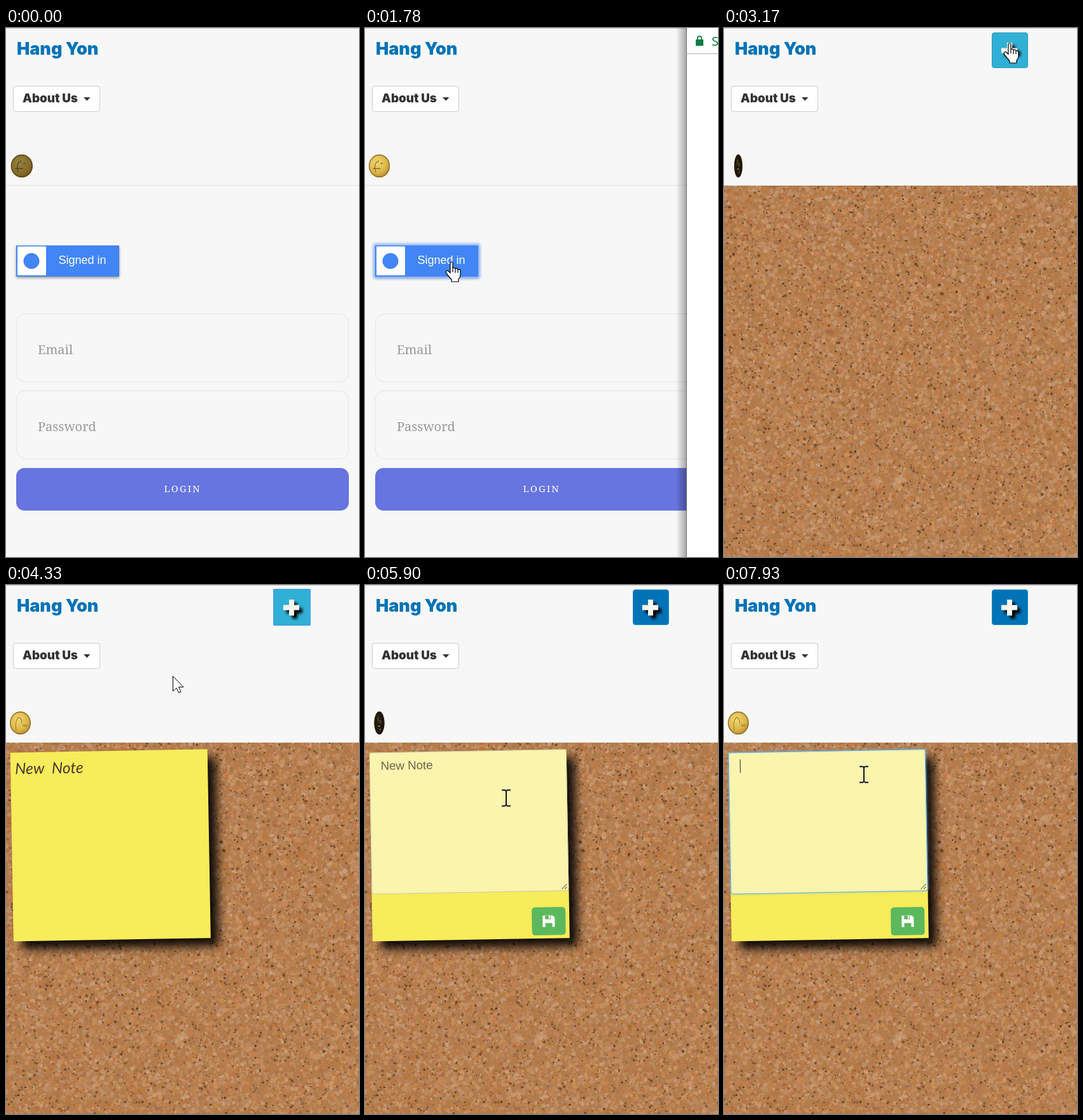
These frames come from a looping animation (555 by 832 pixels, 7.99 s). An HTML page with a canvas:

```html
<!DOCTYPE html>
<html lang="en">
<head>
<meta charset="utf-8">
<title>Note board</title>
<style>
  html, body { margin: 0; width: 100%; height: 100%; overflow: hidden; background: #f7f7f7; }
  canvas, svg { position: absolute; left: 0; top: 0; display: block; }
  .brand { font: 900 27px Inter, sans-serif; fill: #0073b7; }
  .menu { font: 900 18.8px Inter, sans-serif; fill: #333; }
  .slab { font: 20px "Noto Serif", serif; fill: #999; }
  .login { font: 15px "Noto Serif", serif; letter-spacing: 2px; fill: #fff; }
  .sans { font: 18px "Liberation Sans", Arial, sans-serif; fill: #fff; }
  .hand { font: italic 24.5px Lato, sans-serif; word-spacing: 6px; fill: #4a3930; }
  .typed { font: 18.7px "Liberation Sans", Arial, sans-serif; fill: #69654f; white-space: pre; }
  .lock { font: 20px "Noto Sans", sans-serif; fill: #0b8043; }
</style>
</head>
<body>
<canvas id="cork" width="555" height="832"></canvas>
<svg width="555" height="832" viewBox="0 0 555 832">
  <defs>
    <radialGradient id="gold" cx=".4" cy=".35" r=".75">
      <stop offset="0" stop-color="#f2d873"/>
      <stop offset=".6" stop-color="#dcb548"/>
      <stop offset="1" stop-color="#a9802c"/>
    </radialGradient>
    <linearGradient id="side">
      <stop offset="0" stop-color="#000" stop-opacity="0"/>
      <stop offset="1" stop-color="#000" stop-opacity=".32"/>
    </linearGradient>
    <filter id="soft" x="-30%" y="-30%" width="160%" height="160%"><feGaussianBlur stdDeviation="8"/></filter>
    <filter id="blur" x="-40%" y="-40%" width="180%" height="180%"><feGaussianBlur stdDeviation="2"/></filter>
    <path id="cross" d="M445 23h8v8.500h8v8h-8v8.500h-8v-8.500h-9v-8h9z"/>
  </defs>

  <rect width="555" height="248" fill="#f7f7f7"/>
  <path d="M0 .5H555" stroke="#c4c4c4"/>
  <path d="M0 247.500H555" stroke="#e3e3e3"/>
  <text class="brand" x="17" y="42">Hang Yon</text>
  <rect x="11.500" y="91.500" width="136" height="40" rx="4" fill="#fff" stroke="#ccc"/>
  <text class="menu" x="26" y="117">About Us</text>
  <path d="M122 109h10.500l-5.250 5.500z" fill="#333"/>

  <g id="coin">
    <circle r="18" fill="url(#gold)"/>
    <circle r="17.200" fill="none" stroke="#8d6b26" stroke-width="1.400"/>
    <path id="heads" d="M-6 10Q-10 0-4-7M-2-9v4M2-4h4M-11 4H2" fill="none" stroke="#8a6826" stroke-width="1.300"/>
    <path id="tails" d="M-7 12Q-10-3-3-9Q4-6 2 1M4 3h9M5 5h7" fill="none" stroke="#a07a2c" stroke-width="1.100"/>
    <circle id="dusk" r="18" fill="#100b06"/>
    <path id="glint" d="M-4-10v8M3-5v6M-5 5h8M3 8v4" stroke="#b08a3c" stroke-width="2"/>
  </g>

  <g id="signin">
    <rect y="248" width="555" height="584" fill="#f7f7f7"/>
    <rect x="16" y="344" width="162" height="49" rx="1" fill="#000" opacity=".4" filter="url(#blur)"/>
    <rect id="glow" x="13" y="339" width="168" height="55" rx="3" fill="#8fb5f8" filter="url(#blur)"/>
    <rect x="16" y="342" width="162" height="49" rx="1" fill="#4285f4"/>
    <rect x="18" y="343.500" width="45" height="45.500" rx="1" fill="#fff"/>
    <circle cx="40" cy="366.500" r="12.500" fill="#4285f4"/>
    <text class="sans" x="82.500" y="371">Signed in</text>
    <g fill="#f7f7f7" stroke="#e5e5e5">
      <rect x="16.500" y="449.500" width="522" height="107" rx="14"/>
      <rect x="16.500" y="570.500" width="522" height="107" rx="14"/>
    </g>
    <text class="slab" x="50" y="513">Email</text>
    <text class="slab" x="50" y="634">Password</text>
    <rect id="login" x="16" y="692" width="523" height="67" rx="13"/>
    <text class="login" x="248.500" y="730">LOGIN</text>
  </g>

  <g id="add">
    <rect id="ring" x="420" y="6" width="59" height="58" rx="2" fill="#4d9bf0"/>
    <rect id="plate" x="421.500" y="7.500" width="56" height="55" rx="3.500"/>
    <use href="#cross" x="5" y="5" filter="url(#blur)"/>
    <use href="#cross" fill="#f7f6ef"/>
  </g>

  <g id="note" transform="translate(164.250 409.400) rotate(-1) translate(-155 -148.500)">
    <rect x="13" y="13" width="310" height="297" fill="#000" opacity=".92" filter="url(#soft)"/>
    <rect width="310" height="297" fill="#f7ec5a"/>
    <g id="view">
      <text class="hand" x="7" y="34">New Note</text>
      <g id="tools">
        <rect x="194" y="248" width="53" height="44" rx="5" fill="#0073b7"/>
        <path d="M212 279l2-7 11-11 5 5-11 11z" fill="#fff"/>
        <rect x="251" y="248" width="53" height="44" rx="5" fill="#d9534f"/>
        <path d="M270 262h16v3h-16zM275 259h6v3h-6zM271 267h14l-1 13h-12z" fill="#fff"/>
      </g>
    </g>
    <g id="edit">
      <rect id="halo" width="310" height="222" rx="4" fill="#66afe9" filter="url(#blur)"/>
      <rect id="area" x=".5" y=".5" width="309" height="222" rx="4" fill="#faf4ad"/>
      <text id="typed" class="typed" x="17.500" y="27.500"></text>
      <path id="caret" stroke="#444" stroke-width="1.200"/>
      <path d="M299 220l8-8M303.500 220l3.500-3.500" stroke="#77755c" stroke-width="1.200"/>
      <rect x="251" y="248" width="53" height="44" rx="5" fill="#5cb85c"/>
      <path d="M268 261h16l3 3v15h-19zM272 261v6h9v-6zM272 273v6h11v-6z" fill="#fff" fill-rule="evenodd"/>
      <path d="M277.500 261h2.500v5h-2.500z" fill="#fff"/>
    </g>
  </g>

  <g id="popup">
    <rect x="489" width="16" height="832" fill="url(#side)"/>
    <rect x="505" width="50" height="832" fill="#fff"/>
    <path d="M505.500 0V832" stroke="#6f6f6f"/>
    <g id="address">
      <path d="M505 40.500H555" stroke="#b0b0b0"/>
      <rect x="520" y="18" width="12" height="10" rx="1" fill="#0b8043"/>
      <path d="M522.800 18v-2a3.200 3.200 0 0 1 6.400 0v2" fill="none" stroke="#0b8043" stroke-width="1.800"/>
      <text class="lock" x="545" y="28">Secure</text>
    </g>
  </g>

  <g id="pointer" stroke-linejoin="round">
    <path id="arrow" d="M.5.5V24L6 19l3.500 7.500 3.500-1.500-3.500-7.500H17z" fill="#fff" stroke="#000"/>
    <path id="finger" d="M-2 1.500Q0-2 2 1.500V10Q4.500 7.500 6 11Q8.500 8.500 10 12Q13.500 10.500 14 14.500V20Q14 24 11 27V31H0V28L-6.500 20Q-10.500 15-7.500 13.800Q-5 13-2 17.500ZM2 10v6M6 11v6M10 12v5" fill="#fff" stroke="#000" stroke-width="1.200"/>
    <path id="beam" d="M-7-12.500h5l2 1.500 2-1.500h5M0-11V11M-7 12.500h5l2-1.500 2 1.500h5" fill="none" stroke="#11112c" stroke-width="2"/>
  </g>
</svg>
<script>
const LOOP = 7990;
const $ = id => document.getElementById(id);
const show = (id, on) => $(id).style.display = on ? '' : 'none';
const ramp = (t, a, b) => Math.min(1, Math.max(0, (t - a) / (b - a)));
const inside = (p, x0, y0, x1, y1) => p.x >= x0 && p.x <= x1 && p.y >= y0 && p.y <= y1;

// Times of the user's actions
const BOARD = 2020, ADDED = 3640, EDIT = 5260, FOCUS = 6450, ERASE = 6930;

// Pointer stops: time, x, y
const PATH = [
  [50, 330, 715], [180, 320, 700], [960, 136, 368], [2400, 136, 368],
  [2730, 230, 252], [3090, 449, 24], [3680, 449, 24], [4150, 262, 143],
  [4335, 262, 143], [4395, 258, 205], [4850, 225, 525], [5080, 209, 541],
  [5300, 209, 541], [5780, 222, 335], [6120, 222, 335], [6400, 220, 298], [LOOP, 220, 298]
];

function pointerAt(t) {
  const i = Math.max(1, PATH.findIndex(p => p[0] >= t));
  const [a, x0, y0] = PATH[i - 1], [b, x1, y1] = PATH[i];
  const u = ramp(t, a, b), k = u * u * (3 - 2 * u);
  return { x: x0 + (x1 - x0) * k, y: y0 + (y1 - y0) * k };
}

function pointerKind(t, p) {
  if (t < BOARD) {
    if (inside(p, 16, 342, 178, 391) || inside(p, 16, 692, 539, 759)) return 'finger';
    return inside(p, 16, 449, 539, 557) || inside(p, 16, 570, 539, 678) ? 'beam' : 'arrow';
  }
  if (t < 2400 || inside(p, 421, 7, 478, 63)) return 'finger';
  if (t > EDIT && inside(p, 9, 262, 319, 483)) return 'beam';
  return t > ADDED && inside(p, 205, 506, 316, 551) ? 'finger' : 'arrow';
}

function drawCork() {
  const g = $('cork').getContext('2d');
  let seed = 7;
  const rnd = () => (seed = seed * 16807 % 2147483647) / 2147483647;
  g.fillStyle = '#b27b4b';
  g.fillRect(0, 248, 555, 584);
  g.save();
  g.beginPath();
  g.rect(0, 248, 555, 584);
  g.clip();
  for (let i = 0; i < 21000; i++) {
    const x = rnd() * 555, y = 248 + rnd() * 584, dark = rnd() < .17;
    const r = dark ? 1 + rnd() * 1.8 : 1.5 + rnd() * 3.5;
    const light = dark ? 27 + rnd() * 14 : 44 + (rnd() + rnd()) * 10;
    g.fillStyle = `hsl(${24 + rnd() * 6}, ${36 + rnd() * 14}%, ${light}%)`;
    const turn = rnd() * 6.28;
    g.beginPath();
    for (let k = 0; k < 5; k++) {
      const a = turn + k * 1.257, d = r * (.55 + rnd() * .6);
      g.lineTo(x + Math.cos(a) * d, y + Math.sin(a) * d);
    }
    g.fill();
  }
  g.restore();
}

function drawCoin(t) {
  const turn = (18 + t * .2) * Math.PI / 180;
  const c = Math.cos(turn), w = Math.abs(c);
  const dull = 1 - ramp(t, 50, 300);
  const lit = ramp(w, .5, .93);
  $('coin').setAttribute('transform',
    `translate(${22.5 + 2.3 * dull} 217) scale(${Math.max(.15, w * (.95 + .05 * dull))} 1)`);
  $('dusk').setAttribute('opacity', Math.max(.92 * (1 - lit), .42 * dull));
  $('glint').setAttribute('opacity', .8 * (1 - lit));
  show('heads', c > 0);
  show('tails', c <= 0);
}

function drawNote(t) {
  const editing = t >= EDIT, focused = t >= FOCUS;
  show('note', t >= ADDED);
  show('view', !editing);
  show('edit', editing);
  $('tools').setAttribute('opacity', ramp(t, 4420, 4670));
  show('halo', focused);
  $('area').setAttribute('stroke', focused ? '#66afe9' : '#c9c8ae');
  const gone = t < ERASE ? 0 : Math.floor((t - ERASE) / 92) + 1;
  const label = 'New Note'.slice(0, Math.max(0, 8 - gone));
  $('typed').textContent = label;
  show('caret', focused);
  if (focused) {
    const x = 18.5 + (label ? $('typed').getComputedTextLength() : 0);
    $('caret').setAttribute('d', `M${x} 11V32`);
  }
}

function render(t) {
  const p = pointerAt(t), kind = pointerKind(t, p);
  drawCoin(t);
  drawNote(t);

  show('signin', t < BOARD);
  show('glow', t >= 1100);
  $('login').setAttribute('fill', t > 50 && inside(p, 16, 692, 539, 759) ? '#5a68d2' : '#6675df');

  show('popup', t >= 1480 && t < 1960);
  $('popup').setAttribute('opacity', ramp(t, 1460, 1660));
  show('address', t >= 1600);

  const over = inside(p, 421, 7, 478, 63);
  const held = t >= 3500 && t < EDIT;
  show('add', t >= BOARD);
  show('ring', held);
  $('plate').setAttribute('fill', over || held ? '#31b0d5' : '#0073b7');
  $('plate').setAttribute('stroke', held ? '#31b0d5' : over ? '#269abc' : '#1b8fc6');

  show('pointer', t >= 50);
  $('pointer').setAttribute('transform', `translate(${p.x} ${p.y})`);
  for (const id of ['arrow', 'finger', 'beam']) show(id, id === kind);
}

function tick() {
  render(performance.now() % LOOP);
  requestAnimationFrame(tick);
}

drawCork();
tick();
</script>
</body>
</html>
```
